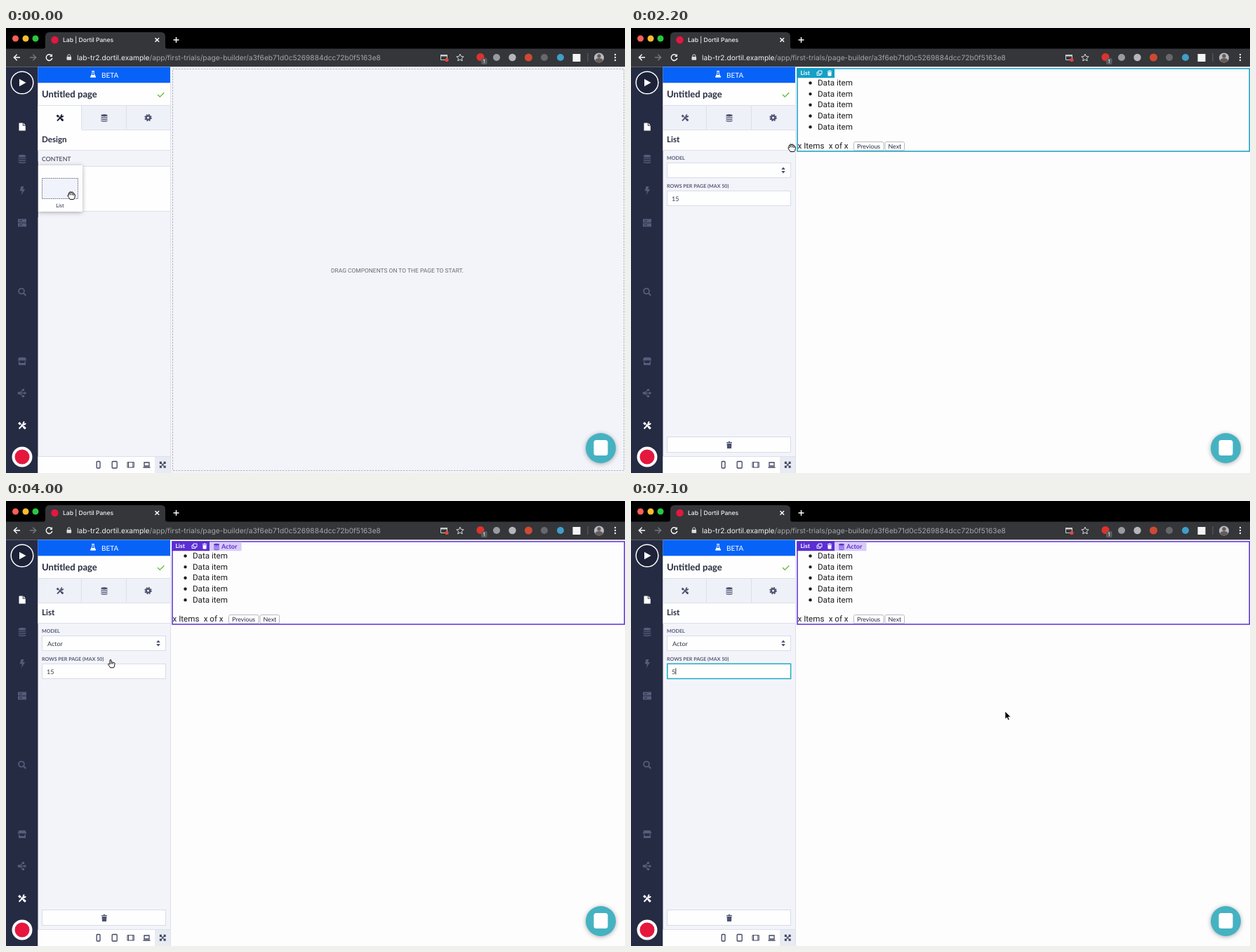
An HTML page that plays this animation: 882 px wide and 635 px high, repeating every 7200 ms.

```html
<!DOCTYPE html>
<html lang="en">
<head>
<meta charset="utf-8">
<title>Page builder</title>
<style>
html, body { margin: 0; width: 100%; height: 100%; overflow: hidden; background: #fdfdfd; }
svg { display: block; }
text { font-family: Lato, sans-serif; fill: #262b40; white-space: pre; text-rendering: geometricPrecision; }
.ui { font-family: Inter, sans-serif; }
.page { font: 11.6px Roboto, sans-serif; fill: #1d1d1f; }
.hint { font: 8.45px Roboto, sans-serif; fill: #666973; }
.b { font-weight: 700; }
.label { font-size: 7.15px; font-weight: 700; fill: #555b75; }
.field { font-size: 9px; fill: #33384a; }
.tag { font-size: 8.4px; font-weight: 700; fill: #fff; }
.btn { font-size: 8.8px; }
.menu { font: 600 8.7px Inter, sans-serif; fill: #fff; }
.line { fill: none; stroke: currentColor; stroke-width: 1.3; }
.rule { stroke: #dde0ea; }
.dash { fill: none; stroke: #b3b5bd; stroke-dasharray: 2.5 1.5; }
.box { fill: #fefefe; stroke: #d9dce7; }
.focus { fill: none; stroke: #20abc4; stroke-width: 1.5; }
.select { fill: none; stroke: currentColor; stroke-width: 1.5; }
.muted { color: #565c79; }
.shade { filter: drop-shadow(0 1px 3px rgba(0, 0, 0, .32)); }
.soft { filter: drop-shadow(0 1px 2px rgba(0, 0, 0, .2)); }
.pen { fill: #fff; stroke: #111; stroke-width: 1; stroke-linejoin: round; }
</style>
</head>
<body>
<svg width="882" height="635" viewBox="0 0 882 635">
<defs>
  <linearGradient id="menuFill" x2="0" y2="1"><stop stop-color="#838383"/><stop offset="1" stop-color="#747474"/></linearGradient>
  <g id="db" fill="currentColor">
    <ellipse cy="-3.2" rx="4.6" ry="1.7"/>
    <path d="M-4.6-2v1.2c0 2 9.2 2 9.2 0V-2c0 2-9.2 2-9.2 0zm0 2.5v1.3c0 2 9.2 2 9.2 0V.5c0 2-9.2 2-9.2 0zm0 2.6v1.2c0 2 9.2 2 9.2 0V3.1c0 2-9.2 2-9.2 0z"/>
  </g>
  <g id="tools" fill="none" stroke="currentColor" stroke-width="1.9">
    <path d="M-4 4.4 2.4-2M-1.2-1.2 4.3 4.3"/>
    <path stroke-width="2.8" d="M-4.4-3.6-2-1.2M1.8 1.8 4.3 4.3"/>
    <path stroke-width="1.6" d="M2.8-4.8Q0-2 2.3-1.9 2 .3 4.8-2.6"/>
  </g>
  <g id="gear">
    <circle r="4.2" fill="none" stroke="currentColor" stroke-width="2" stroke-dasharray="1.9 1.4"/>
    <circle r="2.7" fill="none" stroke="currentColor" stroke-width="2.3"/>
  </g>
  <path id="bin" fill="currentColor" d="M-4-4h2.4l.6-1h2l.6 1H4v1.3h-8zM-3.4-2h6.8L3 5h-6z"/>
  <g id="copy" fill="none" stroke="currentColor" stroke-width=".9"><path d="M-1.5-3h5v4.5h-5z"/><path d="M-1.5-1h-2v4.5h5v-2"/></g>
  <g id="card">
    <rect class="shade" width="63" height="66" fill="#fefefe"/>
    <rect x="5.5" y="18.5" width="51" height="29" fill="#f0f3fc" stroke="#777b8b" stroke-dasharray="2 1"/>
    <text x="31" y="60" font-size="7.4" text-anchor="middle">List</text>
  </g>
  <g id="item"><circle cx="255.5" cy="-3.6" r="2.2" fill="#1d1d1f"/><text class="page" x="266">Data item</text></g>
  <path id="sort" fill="currentColor" d="M-2.8-1 0-4.6 2.8-1zM-2.8 1 0 4.6 2.8 1z"/>
</defs>

<!-- Browser bar -->
<rect width="882" height="31"/>
<path d="M52 30q4 0 4-4V12q0-6 6-6h159q6 0 6 6v14q0 4 4 4z" fill="#35363a"/>
<rect y="29.5" width="882" height="26" fill="#35363a"/>
<circle cx="13.5" cy="15" r="4.5" fill="#ff5f57"/>
<circle cx="28" cy="15" r="4.5" fill="#febc2e"/>
<circle cx="42" cy="15" r="4.5" fill="#28c840"/>
<circle cx="69.5" cy="17" r="5.2" fill="#e5173f"/>
<text class="ui" x="81" y="20" font-size="8.6" font-weight="500" style="fill:#f1f1f1">Lab | Dortil Panes</text>
<g fill="none" stroke="#fff" stroke-width="1.4">
  <path d="m212.5 14.2 5.6 5.6m0-5.6-5.6 5.6M238.5 17h8m-4-4v8M20 42h-8.5m4.2-4.2L11.3 42l4.4 4.2M65 39.5a4.3 4.3 0 1 0 .8 3.5"/>
  <path d="M34 42h8.5m-4.2-4.2 4.4 4.2-4.4 4.2" stroke="#77787b"/>
  <path d="M87.8 41v-1.2a2 2 0 0 1 4 0V41" stroke="#ddd" stroke-width="1"/>
</g>
<path d="M66 37v4h-4z" fill="#fff"/>
<rect x="86.5" y="41" width="6.6" height="4.8" rx=".7" fill="#ddd"/>
<text class="ui" x="101" y="45.5" font-size="10.2" style="fill:#a4a6aa"><tspan fill="#f1f1f1">lab-tr2.dortil.example</tspan>/app/first-trials/page-builder/a3f6eb71d0c5269884dcc72b0f5163e8</text>
<path d="M619.5 38.5h9v7h-9z" fill="none" stroke="#ccc"/><path d="M619 38h10v2.5h-10z" fill="#ccc"/>
<circle cx="628" cy="45.5" r="2.6" fill="#e3473c"/>
<path d="m647 37.2 1.5 3.3 3.6.4-2.7 2.4.8 3.6-3.2-1.9-3.2 1.9.8-3.6-2.7-2.4 3.6-.4z" fill="none" stroke="#ddd"/>
<circle cx="676" cy="41.5" r="5.5" fill="#e0322c"/>
<rect x="677" y="43" width="8.5" height="9" rx="2" fill="#5b5d61"/>
<text class="ui" x="681.2" y="50.3" font-size="7" text-anchor="middle" style="fill:#fff">1</text>
<circle cx="699" cy="42" r="5" fill="#9a9b9e"/>
<circle cx="721.5" cy="42" r="5.2" fill="#b5b6b9"/>
<circle cx="744.5" cy="42" r="5.5" fill="#cf4932"/>
<circle cx="767" cy="42" r="5" fill="#66686c"/>
<circle cx="790" cy="42" r="5" fill="#3f9fc8"/>
<rect x="807.5" y="37" width="11" height="11" fill="#f4f4f4"/>
<path d="M829 36v12" stroke="#606165"/>
<circle cx="845" cy="42.5" r="7" fill="#b9bcc4"/>
<path d="M839.5 47q0-4 5.5-4t5.500 4q-5 5-11 0z" fill="#665c5a"/><circle cx="845" cy="40" r="2.7" fill="#665c5a"/>
<g fill="#eee"><circle cx="868" cy="38" r="1.2"/><circle cx="868" cy="42" r="1.2"/><circle cx="868" cy="46" r="1.2"/></g>

<!-- Side bar -->
<rect y="55.5" width="46" height="580" fill="#252b43"/>
<circle cx="23" cy="78" r="15.8" fill="#1d2238" stroke="#fff" stroke-width="1.5"/>
<path d="M19 72.8 28.5 78 19 83.2z" fill="#fff"/>
<path d="M18.5 135.5h5.3v4h4v7h-9.3zm6.2 0 3.1 3.1h-3.1z" fill="#fff"/>
<g class="muted">
  <use href="#db" transform="translate(23 186.5) scale(1.15)"/>
  <path fill="currentColor" d="M21.5 226h4l-1.5 4h3.2l-5.7 8.5 1.5-6h-3.3z"/>
  <path fill="currentColor" d="M17 272.5h12v5H17zm0 6h12v5H17z"/>
  <path d="M19 275h4m-4 6h4" stroke="#252b43"/>
  <circle class="line" cx="22" cy="375.5" r="3.9" style="stroke-width:1.8"/><path class="line" d="m25 378.5 3.3 3.3" style="stroke-width:2"/>
  <path fill="currentColor" d="M18.5 470h9l2 4.5h-13zm-.5 5.5h1.5v2.5h7v-2.5H28v5.5H18z"/>
  <path class="line" d="M19 521h7M20 520l4-3m-4 5 4 3"/>
  <g fill="currentColor"><circle cx="18.5" cy="521" r="2"/><circle cx="24.5" cy="516.5" r="1.8"/><circle cx="27" cy="521" r="1.8"/><circle cx="24.5" cy="525.5" r="1.8"/></g>
</g>
<use href="#tools" color="#fff" transform="translate(23 567) scale(1.1)"/>
<circle cx="23" cy="612" r="14.5" fill="#fff"/><circle cx="23" cy="612" r="10.5" fill="#e5173f"/>

<!-- Panel -->
<rect x="45.5" y="55.5" width="189.5" height="580" fill="#f3f4fa"/>
<rect x="45.5" y="55.5" width="188.5" height="23" fill="#0763f8"/>
<path d="M122.3 61.5h3.6M123 62v3l-2.6 5h7.4l-2.6-5v-3" fill="none" stroke="#fff"/><path d="M122 67h4.2l1.6 3.2h-7.4z" fill="#fff"/>
<text x="136" y="70.5" font-size="10" style="fill:#fff">BETA</text>
<rect x="45.5" y="78.5" width="188.5" height="32" fill="#fefefe"/>
<text class="b" x="51" y="98.5" font-size="13.1">Untitled page</text>
<path d="m216 95 3.3 3.3 6-6" fill="none" stroke="#6cc04a" stroke-width="1.5"/>
<rect x="45.5" y="110.5" width="188.5" height="35" fill="#eff1f8"/>
<rect data-on="0-1600" x="45.5" y="110" width="62.5" height="36" fill="#fefefe"/>
<rect x="45.5" y="145.5" width="188.5" height="29" fill="#fefefe"/>
<path class="rule" d="M45.5 110.5H234M108 145.5h126M107.5 111v34M171.5 111v34M45.5 174.5H234"/>
<path data-on="1600-7200" class="rule" d="M45.5 145.5H108"/>
<use href="#tools" data-on="0-1600" color="#171b30" x="77" y="128"/>
<use href="#tools" data-on="1600-7200" color="#4d5370" x="77" y="128"/>
<use href="#db" color="#4d5370" x="140" y="128"/>
<use href="#gear" color="#4d5370" x="202.5" y="128"/>
<rect x="45.5" y="612" width="188.5" height="23" fill="#fefefe"/>
<rect x="212" y="612" width="22" height="23" fill="#e9ebf3"/>
<path class="rule" d="M45.5 611.5H234M234.5 78v557"/>
<g color="#3f455f">
  <rect class="line" x="129.2" y="618.5" width="4.8" height="9.5" rx="1"/>
  <rect class="line" x="151.2" y="618.5" width="7" height="9.5" rx="1"/>
  <path class="line" d="M173 619.7h9.3v7.3H173zm1.5 0v7.3m6.3-7.3v7.3" style="stroke-width:1"/>
  <path class="line" d="M197 620h7v5h-7zm-1.5 7h10"/>
  <path class="line" d="m220 620 6.5 6.5m0-6.5-6.5 6.5M219.5 622v-2.5h2.5m2.5 0h2.5v2.5m0 2.5v2.5h-2.5m-2.5 0h-2.5v-2.5"/>
</g>

<g data-on="0-1600">
  <text class="b" x="51" y="163" font-size="11.6">Design</text>
  <text x="51" y="189.5" font-size="8.75">CONTENT</text>
  <rect x="45.5" y="197.5" width="188.5" height="64" fill="#fefefe"/>
  <path class="rule" d="M45.5 197.5H234M45.5 261.5H234"/>
  <use href="#card" x="46" y="196"/>
  <rect x="40" y="190" width="5.5" height="80" fill="#252b43"/>
</g>

<g data-on="1600-7200">
  <text class="b" x="51" y="163" font-size="11.6">List</text>
  <text class="label" x="51" y="188">MODEL</text>
  <rect class="box" x="51.5" y="192.5" width="176" height="21"/>
  <use href="#sort" color="#4d5370" x="217" y="203"/>
  <text class="label" x="51" y="228">ROWS PER PAGE (MAX 50)</text>
  <rect class="box" x="51.5" y="232.5" width="176" height="21"/>
  <rect class="box" x="51.5" y="583.5" width="176" height="22"/>
  <use href="#bin" color="#4d5370" x="140" y="595"/>
</g>
<text data-on="4000-7200" class="field" x="59" y="206.5">Actor</text>
<rect data-on="4500-7200" class="focus" x="51.8" y="232.3" width="175.8" height="21.2"/>
<rect data-on="4600-5200" x="58" y="238" width="10" height="10" fill="#b3d5fb"/>
<text data-on="1600-5200" class="field" x="58" y="246.5">15</text>
<text data-on="5200-7200" class="field" x="58" y="246.5">5</text>
<path data-on="5200-7200" d="M63.8 238.5v9" stroke="#222" stroke-width=".9"/>

<!-- Canvas -->
<g data-on="0-1600">
  <rect x="235" y="55.5" width="647" height="580" fill="#f3f4fa"/>
  <rect class="dash" x="237.5" y="58.5" width="643" height="573"/>
  <text class="hint" x="463" y="348.8">DRAG COMPONENTS ON TO THE PAGE TO START.</text>
</g>
<g data-on="400-1600" color="#159fc7">
  <rect class="select" x="237" y="57.9" width="644.2" height="574.5"/>
  <rect x="236.3" y="57.2" width="31" height="14" fill="currentColor"/>
  <text class="tag" x="241.5" y="67.2">Body</text>
</g>
<g data-on="1600-7200">
  <rect x="235" y="55.5" width="647" height="580" fill="#fdfdfd"/>
  <use href="#item" y="82"/><use href="#item" y="97.7"/><use href="#item" y="113.4"/><use href="#item" y="129.1"/><use href="#item" y="144.8"/>
  <text class="page" x="237.5" y="172">x Items</text>
  <text class="page" x="281.7" y="172">x of x</text>
  <g fill="#fff" stroke="#b9bac0"><rect x="317.5" y="162.5" width="42.5" height="12.5" rx="2"/><rect x="362" y="162.5" width="27.5" height="12.5" rx="2"/></g>
  <text class="btn" x="322" y="171.8">Previous</text>
  <text class="btn" x="366.5" y="171.8">Next</text>
  <g id="frame">
    <rect class="select" x="237" y="57.9" width="644.2" height="118"/>
    <rect x="236.3" y="57.2" width="53.7" height="14" fill="currentColor"/>
    <text class="tag" x="241.5" y="67.2">List</text>
    <use href="#copy" color="#fff" x="268.5" y="64"/>
    <use href="#bin" color="#fff" transform="translate(283 64.5) scale(.8)"/>
  </g>
</g>
<g data-on="4000-7200">
  <rect x="290" y="58.6" width="45.5" height="12.6" fill="#d8cbf7"/>
  <use href="#db" color="#5b2fd4" transform="translate(300 65) scale(.85)"/>
  <text class="tag" x="307" y="67.8" style="fill:#5b2fd4;font-size:9px">Actor</text>
</g>

<g data-on="2700-4000">
  <rect class="focus" x="51.8" y="192.3" width="175.8" height="21.2"/>
  <rect class="soft" x="44" y="193" width="178" height="67.5" rx="4" fill="url(#menuFill)"/>
  <rect id="pick" x="44.5" width="177" height="12.6" fill="#3f92f8"/>
  <path d="m48.3 202 2.2 2.5 3.7-5.8" fill="none" stroke="#fff" stroke-width="1.4"/>
  <text class="menu" x="59" y="217.8">ApplicationUser</text>
  <text class="menu" x="59" y="230">Actor</text>
  <text class="menu" x="59" y="242">Role</text>
  <text class="menu" x="59" y="254.2">User</text>
</g>

<circle class="shade" cx="847.5" cy="599.5" r="21.5" fill="#45b2c2"/>
<rect x="837.5" y="588" width="20" height="22" rx="3.5" fill="#fff"/>

<g id="ghost" data-on="200-1500" opacity=".88"><use href="#card" transform="scale(.98 .95)"/></g>
<g id="cursor">
  <path data-on="200-2200,2300-2500,4100-4400,5600-7200" d="M0 0v11.3l2.6-2.4 1.7 3.8 2-.8-1.7-3.7h3.6z" fill="#000" stroke="#fff" stroke-width=".8"/>
  <path data-on="0-200,2200-2300" class="pen" d="M-2 5.5C-3 3-5 1.5-5.2-.3q.3-1.3 2 .2L-4-3q.6-1.8 1.8 0-.3-3 1.2-2.4l.9 1.8q.6-2.6 2-1.3l.2 1.7q1.6-1.2 2 .4l.3 1.7Q6-1.8 5.4.5 5.2 3.5 3.6 5.500zM-1.6-3l.6 2.5M1-3.2l.1 2.6M3-2.5V0"/>
  <path data-on="2500-4100" class="pen" d="M-1.5 5.8C-2.5 3.5-4.5 2-4.5.6q.6-1.2 2.5.5v-6q1.1-1.6 2 0v3q1.300-.8 2 .3 1.200-.6 1.800.5 1.200-.3 1.200.8 0 3.600-1.400 6.100zM0-1.500V.7M2-1V.9"/>
  <path data-on="4400-5200,5500-5600" d="M-2.500-5.500q2.500 0 2.500 1.500v8q0 1.500-2.500 1.500m5 0Q0 5.500 0 4v-8q0-1.500 2.500-1.500M-1.500 0h3" fill="none" stroke="#222" stroke-width="1.1"/>
</g>
</svg>
<script>
const LOOP = 7200, STEP = 100;
// Pointer path: time, x, y
const path = [
  [100, 93, 239], [700, 392, 177], [1300, 440, 182], [1900, 440, 182],
  [2200, 229, 171], [2500, 166, 209], [3000, 166, 212], [3700, 152, 233],
  [4000, 150, 232], [4500, 62, 243], [5500, 62, 243], [6200, 505, 288], [7100, 533, 300]
];
const $ = id => document.getElementById(id);
const timed = [...document.querySelectorAll('[data-on]')].map(el => ({
  el, spans: el.dataset.on.split(',').map(s => s.split('-').map(Number))
}));

function pointAt(t) {
  const i = path.findIndex(p => p[0] >= t);
  if (i <= 0) return path[0].slice(1);
  const [t0, x0, y0] = path[i - 1], [t1, x1, y1] = path[i];
  const k = (t - t0) / (t1 - t0), e = k * k * (3 - 2 * k);
  return [x0 + (x1 - x0) * e, y0 + (y1 - y0) * e];
}

function draw(t) {
  for (const { el, spans } of timed) {
    el.style.display = spans.some(([a, b]) => t >= a && t < b) ? '' : 'none';
  }
  const [x, y] = pointAt(t);
  $('cursor').setAttribute('transform', `translate(${x} ${y})`);
  $('ghost').setAttribute('transform', `translate(${x - 38} ${y - 41})`);
  const row = Math.max(0, Math.min(4, Math.floor((y - 200.5) / 12.2)));
  $('pick').setAttribute('y', 195.5 + row * 12.4);
  $('frame').setAttribute('color', t < 4000 ? '#159fc7' : '#5b2fd4');
}

const start = performance.now();
function tick(now) {
  const t = Math.max(0, now - start) % LOOP;
  draw(Math.floor(t / STEP) * STEP);
  requestAnimationFrame(tick);
}
draw(0);
requestAnimationFrame(tick);
</script>
</body>
</html>
```
